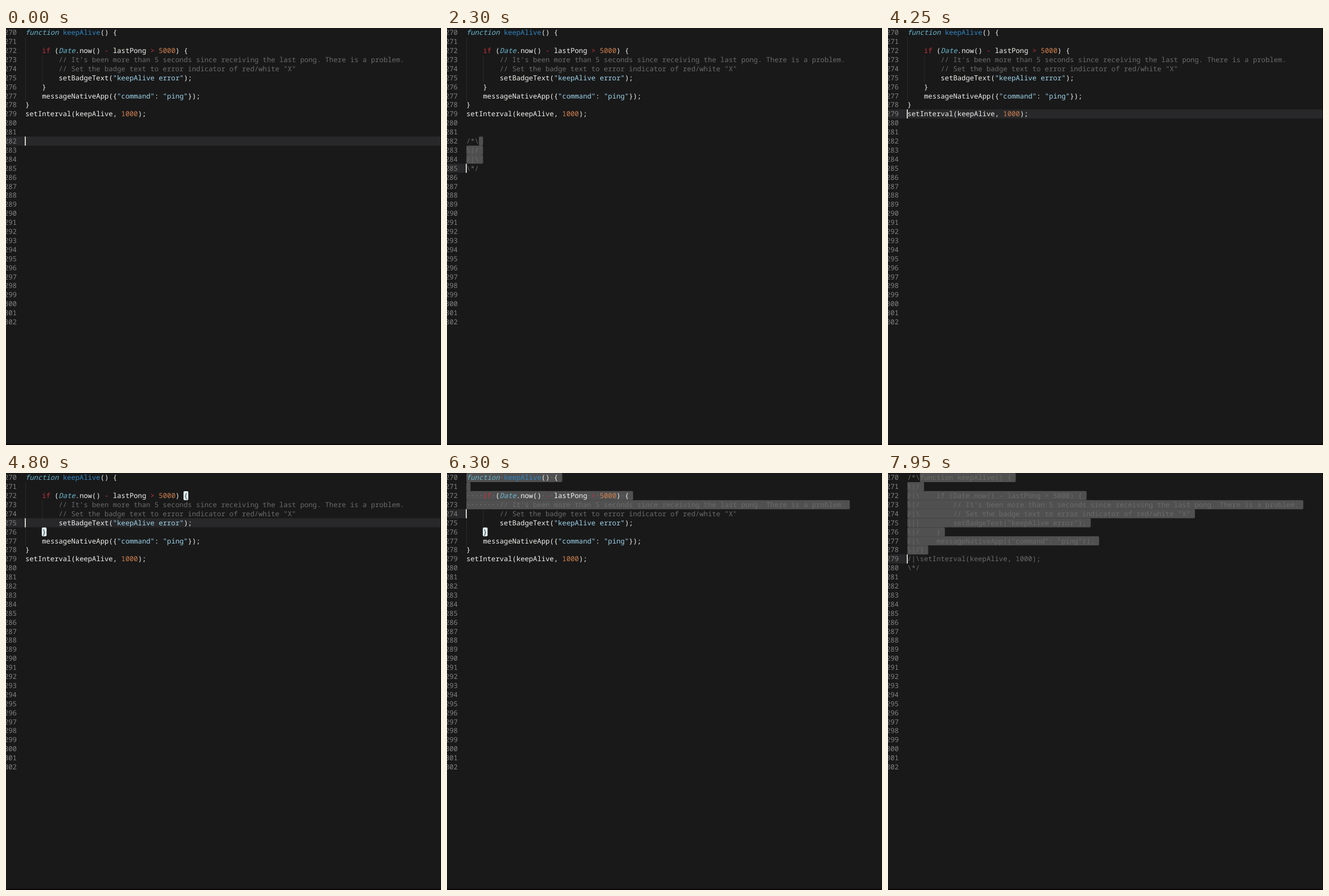
Animation, 764 px wide and 733 px high, one loop 8 s. Source, as an HTML page:

```html
<!DOCTYPE html>
<html lang="en">
<head>
<meta charset="utf-8">
<title>Code editor</title>
<style>
html, body { margin: 0; width: 100%; height: 100%; overflow: hidden; background: #191919; }
svg { display: block; width: 764px; height: 733px; }
text {
  font: 12.2px "Noto Sans Mono", "DejaVu Sans Mono", monospace;
  white-space: pre;
  text-rendering: geometricPrecision;
  font-variant-ligatures: none;
}
.plain { fill: #f2f2f0; }
.type { fill: #6bb8d0; font-style: italic; }
.name { fill: #2f86c4; }
.key { fill: #c4323e; }
.num { fill: #d0804f; }
.str { fill: #9fd4ea; }
.note { fill: #6b6b6b; }
.dot { fill: #7d7d7d; }
.gutter { fill: #828282; }
.dark { fill: #1d3338; }
</style>
</head>
<body>
<svg viewBox="0 0 764 733" xmlns="http://www.w3.org/2000/svg"></svg>
<script>
const LOOP = 8000, LEFT = 34, CHAR = 7.32, LINE = 15.9, ROWS = 33;
const svg = document.querySelector("svg");

const code = [
  'function keepAlive() {',
  '',
  '    if (Date.now() - lastPong > 5000) {',
  '        // It\'s been more than 5 seconds since receiving the last pong. There is a problem.',
  '        // Set the badge text to error indicator of red/white "X"',
  '        setBadgeText("keepAlive error");',
  '    }',
  '    messageNativeApp({"command": "ping"});',
  '}',
  'setInterval(keepAlive, 1000);'
];
const frameMarks = String.raw`/*\ \|/ /|\ \*/`.split(" ");
const codeMarks = String.raw`/*\ \|/ /|\ \|/ /|\ ||| \|/ /|\ \|/ /|\ \*/`.split(" ");

// Comment marks in front of the lines, by document state
const docs = {
  bare: { first: 0, marks: [] },
  box: { first: 12, marks: frameMarks },
  all: { first: 0, marks: codeMarks }
};

// Each step: start time, caret row, selection start [row, col], document
const steps = [];
const step = (t, row, from = null, doc = "bare") => steps.push({ t, row, from, doc });
step(0, 12);
step(1300, 13, [12, 0]);
step(1750, 14, [12, 0]);
step(1950, 14, [12, 3], "box");
step(2150, 15, [12, 3], "box");
step(2900, 15, [12, 0]);
for (let i = 0; i < 3; i++) step(3740 + 210 * i, 11 - i);
for (let i = 0; i < 9; i++) step(4300 + 140 * i, 8 - i);
for (let i = 1; i < 9; i++) step(5600 + 150 * i, i, [0, 0]);
step(6900, 9, [0, 0]);
step(7750, 9, [0, 3], "all");

const colX = col => LEFT + col * CHAR;
const esc = s => s.replace(/&/g, "&amp;").replace(/</g, "&lt;").replace(/>/g, "&gt;");
const rect = (x, y, w, h, fill, rx = 0) =>
  `<rect x="${x}" y="${y}" width="${w}" height="${h}" fill="${fill}" rx="${rx}"/>`;
const put = (cls, x, row, s) =>
  `<text class="${cls}" x="${x.toFixed(2)}" y="${(row * LINE + 12.2).toFixed(2)}">${esc(s)}</text>`;

const rules = [
  ["note", /^\/\/.*/],
  ["str", /^"[^"]*"/],
  ["type", /^(function|Date)\b/],
  ["key", /^(if\b|[->])/],
  ["num", /^\d+/],
  ["plain", /^(\w+|[^\w\s]|\s+)/]
];

function tokens(line) {
  const out = [];
  for (let col = 0; col < line.length;) {
    const rest = line.slice(col);
    let [cls, rx] = rules.find(r => r[1].test(rest));
    const s = rest.match(rx)[0];
    if (line.startsWith("function") && s === "keepAlive") cls = "name";
    out.push({ cls, s, col });
    col += s.length;
  }
  return out;
}

function lineText(doc, row) {
  const { first, marks } = docs[doc];
  return (marks[row - first] || "") + (code[row] || "");
}

// The pair of braces around the caret
function braces(row) {
  if (row >= 3 && row <= 6) return [[2, 38, "{"], [6, 4, "}"]];
  if (row >= 1 && row <= 8) return [[0, 21, "{"], [8, 0, "}"]];
  return [];
}

function drawLine(doc, row, selected) {
  const line = lineText(doc, row);
  if (docs[doc].marks[row - docs[doc].first]) return put("note", LEFT, row, line);
  return tokens(line).map(({ cls, s, col }) => {
    if (s.trim()) return put(cls, colX(col), row, s);
    return selected ? put("dot", colX(col), row, "·".repeat(s.length)) : "";
  }).join("");
}

function draw({ row, from, doc }) {
  const top = row * LINE;
  const selected = r => from && r >= from[0] && r < row;
  let out = rect(0, 0, 764, 733, "#191919");
  out += rect(0, top, from ? LEFT - 1 : 763, 16, "#28282a");

  if (doc !== "all") {
    out += rect(LEFT, LINE, 1, LINE * 7, "#2b2b2b");
    out += rect(colX(4), LINE * 3, 1, LINE * 3, "#2b2b2b");
  }
  for (let r = 0; r < ROWS; r++) {
    if (selected(r)) {
      const start = r === from[0] ? from[1] : 0;
      const width = (lineText(doc, r).length + 1 - start) * CHAR;
      out += rect(colX(start), r * LINE, width, 16, "#505050", 2);
    }
    out += put("gutter", -3, r, String(270 + r)) + drawLine(doc, r, selected(r));
  }
  if (doc === "bare") {
    for (const [r, col, s] of braces(row)) {
      if (selected(r)) continue;
      out += rect(colX(col) - 0.4, r * LINE + 0.3, 8.4, 15.6, "#e4f3f5", 2);
      out += put("dark", colX(col), r, s);
    }
  }
  out += rect(33, top, 1.6, 16, "#f8f8f0");
  out += rect(763, 0, 1, 733, "#0c0c0c") + rect(0, 731, 764, 2, "#0d0608");
  svg.innerHTML = out;
}

let shown = null;
function tick() {
  const t = performance.now() % LOOP;
  const now = steps.findLast(s => s.t <= t);
  if (now !== shown) draw(shown = now);
  requestAnimationFrame(tick);
}
tick();
</script>
</body>
</html>
```
